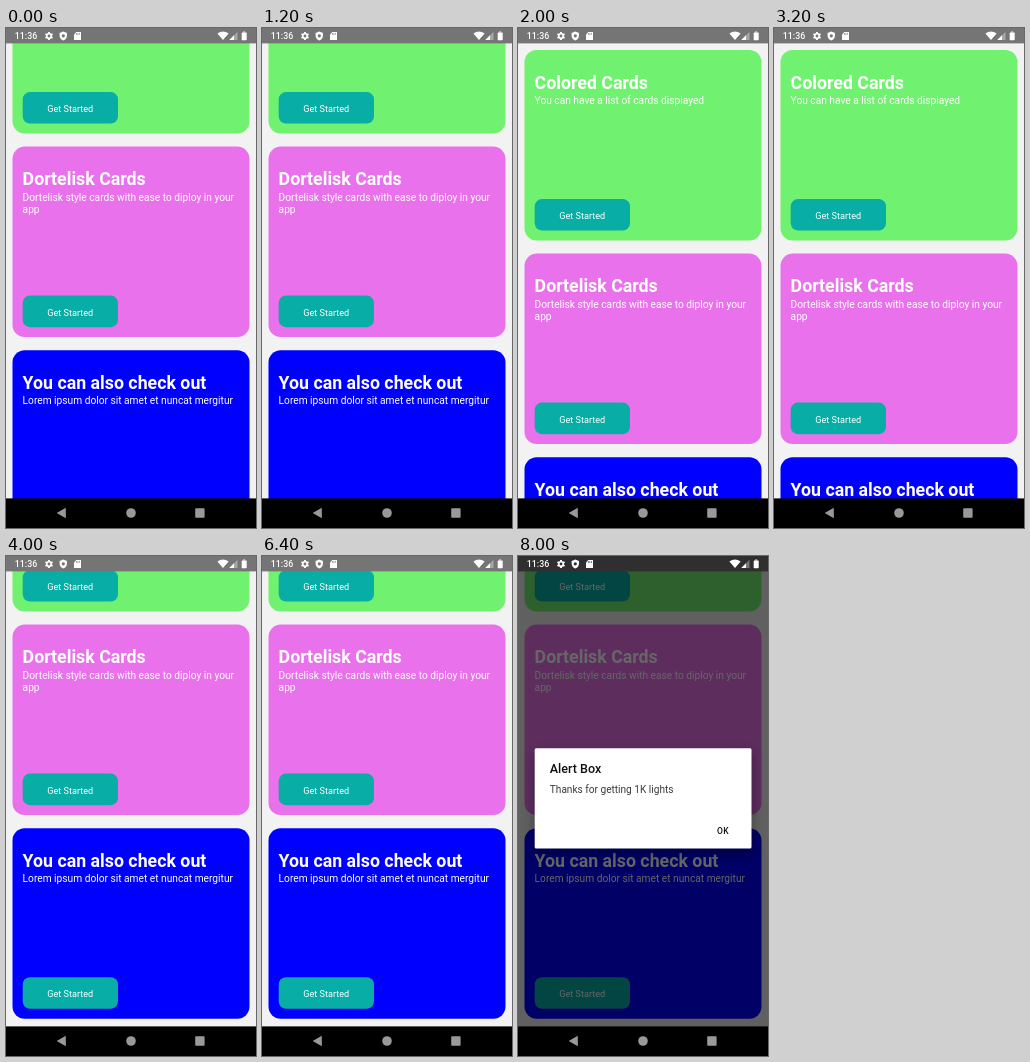
Write an HTML page with a canvas that moves like this. It is 250 by 500 pixels and loops after 10000 ms.

```html
<!DOCTYPE html>
<html lang="en">
<head>
<meta charset="utf-8">
<title>Cards</title>
<style>
html, body { margin: 0; width: 100%; height: 100%; overflow: hidden; background: #f2f2f2; }
canvas { display: block; width: 250px; height: 500px; }
</style>
</head>
<body>
<canvas id="stage"></canvas>
<script>
const W = 250, H = 500, BAR = 15.4, NAV = 470.4, LOOP = 10000;
const canvas = document.getElementById('stage');
const ctx = canvas.getContext('2d');
const ratio = window.devicePixelRatio || 1;
canvas.width = W * ratio;
canvas.height = H * ratio;
ctx.scale(ratio, ratio);

const PITCH = 203.6, CARD_H = 190.5;
const cards = [
  { color: '#70f270', title: 'Colored Cards', lines: ['You can have a list of cards displayed'] },
  { color: '#e972ec', title: 'Dortelisk Cards', lines: ['Dortelisk style cards with ease to diploy in your', 'app'] },
  { color: '#0000ff', title: 'You can also check out', lines: ['Lorem ipsum dolor sit amet et nuncat mergitur'] }
];

// The list jumps between scroll positions
const steps = [
  { at: 0, scroll: 107 },
  { at: 2000, scroll: 0 },
  { at: 4000, scroll: 157 },
  { at: 8000, scroll: 157, alert: true }
];

function text(str, x, y, size, weight = 400, color = '#fff', spacing = 0) {
  ctx.font = `${weight} ${size}px Roboto, sans-serif`;
  ctx.letterSpacing = spacing + 'px';
  ctx.fillStyle = color;
  ctx.fillText(str, x, y);
}

function box(x, y, w, h, r, color) {
  ctx.fillStyle = color;
  ctx.beginPath();
  ctx.roundRect(x, y, w, h, r);
  ctx.fill();
}

function poly(points, color) {
  ctx.fillStyle = color;
  ctx.beginPath();
  points.forEach(([x, y]) => ctx.lineTo(x, y));
  ctx.closePath();
  ctx.fill();
}

function disc(x, y, r, color) {
  ctx.fillStyle = color;
  ctx.beginPath();
  ctx.arc(x, y, r, 0, Math.PI * 2);
  ctx.fill();
}

function drawCard(card, y) {
  box(6.5, y, 237, CARD_H, 12.2, card.color);
  text(card.title, 16.6, y + 38.5, 17.75, 700);
  card.lines.forEach((line, i) => text(line, 16.6, y + 54.2 + i * 12, 10.2));
  box(16.7, y + 149, 95.3, 31.6, 7.3, '#08ada6');
  text('Get Started', 41.3, y + 168.9, 9.12);
}

function drawGear(x, y, bg) {
  ctx.strokeStyle = '#fff';
  ctx.lineWidth = 1.9;
  for (let i = 0; i < 3; i++) {
    const a = Math.PI / 6 + i * Math.PI / 3;
    const dx = Math.cos(a) * 4.1, dy = Math.sin(a) * 4.1;
    ctx.beginPath();
    ctx.moveTo(x - dx, y - dy);
    ctx.lineTo(x + dx, y + dy);
    ctx.stroke();
  }
  disc(x, y, 3.1, '#fff');
  disc(x, y, 1.4, bg);
}

function drawShield(x, y, bg) {
  ctx.fillStyle = '#fff';
  ctx.beginPath();
  ctx.moveTo(x, y - 4.6);
  ctx.lineTo(x + 3.7, y - 3);
  ctx.lineTo(x + 3.7, y - 0.4);
  ctx.quadraticCurveTo(x + 3.4, y + 3.4, x, y + 4.6);
  ctx.quadraticCurveTo(x - 3.4, y + 3.4, x - 3.7, y - 0.4);
  ctx.lineTo(x - 3.7, y - 3);
  ctx.fill();
  disc(x, y - 0.2, 1.6, bg);
}

function drawStatus(bg) {
  ctx.fillStyle = bg;
  ctx.fillRect(0, 0, W, BAR);
  text('11:36', 8.8, 11, 8.8, 500);
  drawGear(43, 8, bg);
  drawShield(57.3, 8, bg);

  poly([[70.4, 4], [75, 4], [75, 12], [68, 12], [68, 6.4]], '#fff');
  ctx.fillStyle = bg;
  for (let i = 0; i < 3; i++) ctx.fillRect(70 + i * 1.5, 5.2, 0.7, 1.7);

  // Wi-Fi fan
  ctx.fillStyle = '#fff';
  ctx.beginPath();
  ctx.moveTo(217, 12);
  ctx.lineTo(211.4, 5.4);
  ctx.quadraticCurveTo(217, 1.8, 222.6, 5.4);
  ctx.fill();

  poly([[231.5, 3.8], [231.5, 12], [223.3, 12]], 'rgba(255,255,255,.35)');
  poly([[228, 7.3], [228, 12], [223.3, 12]], '#fff');

  box(235.7, 4.4, 5, 7.8, 0.6, '#fff');
  ctx.fillRect(237.2, 3.5, 2, 1);
}

function drawNav() {
  const gray = '#999';
  ctx.fillStyle = '#000';
  ctx.fillRect(0, NAV, W, H - NAV);
  poly([[50.6, 485], [59.8, 479.8], [59.8, 490.2]], gray);
  disc(125, 485, 4.8, gray);
  box(189.2, 480.3, 9.4, 9.4, 0.7, gray);
}

function drawAlert() {
  ctx.fillStyle = 'rgba(0,0,0,.6)';
  ctx.fillRect(0, 0, W, H);
  ctx.save();
  ctx.shadowColor = 'rgba(0,0,0,.35)';
  ctx.shadowBlur = 12 * ratio;
  ctx.shadowOffsetY = 5 * ratio;
  box(16.7, 192.3, 216.8, 100.2, 1.5, '#fff');
  ctx.restore();
  text('Alert Box', 31.8, 217.3, 12.5, 500, '#111');
  text('Thanks for getting 1K lights', 31.8, 237, 10.1, 400, '#3c3c3c');
  text('OK', 199, 277.8, 8.5, 500, '#111', 0.5);
}

function draw(now) {
  const t = now % LOOP;
  const step = steps.filter(s => s.at <= t).pop() || steps[0];
  ctx.fillStyle = '#f2f2f2';
  ctx.fillRect(0, 0, W, H);
  cards.forEach((card, i) => drawCard(card, 22 + i * PITCH - step.scroll));
  if (step.alert) drawAlert();
  drawStatus(step.alert ? '#2f2f2f' : '#757575');
  drawNav();
}

const start = performance.now();
function tick() {
  draw(performance.now() - start);
  requestAnimationFrame(tick);
}
tick();
</script>
</body>
</html>
```
